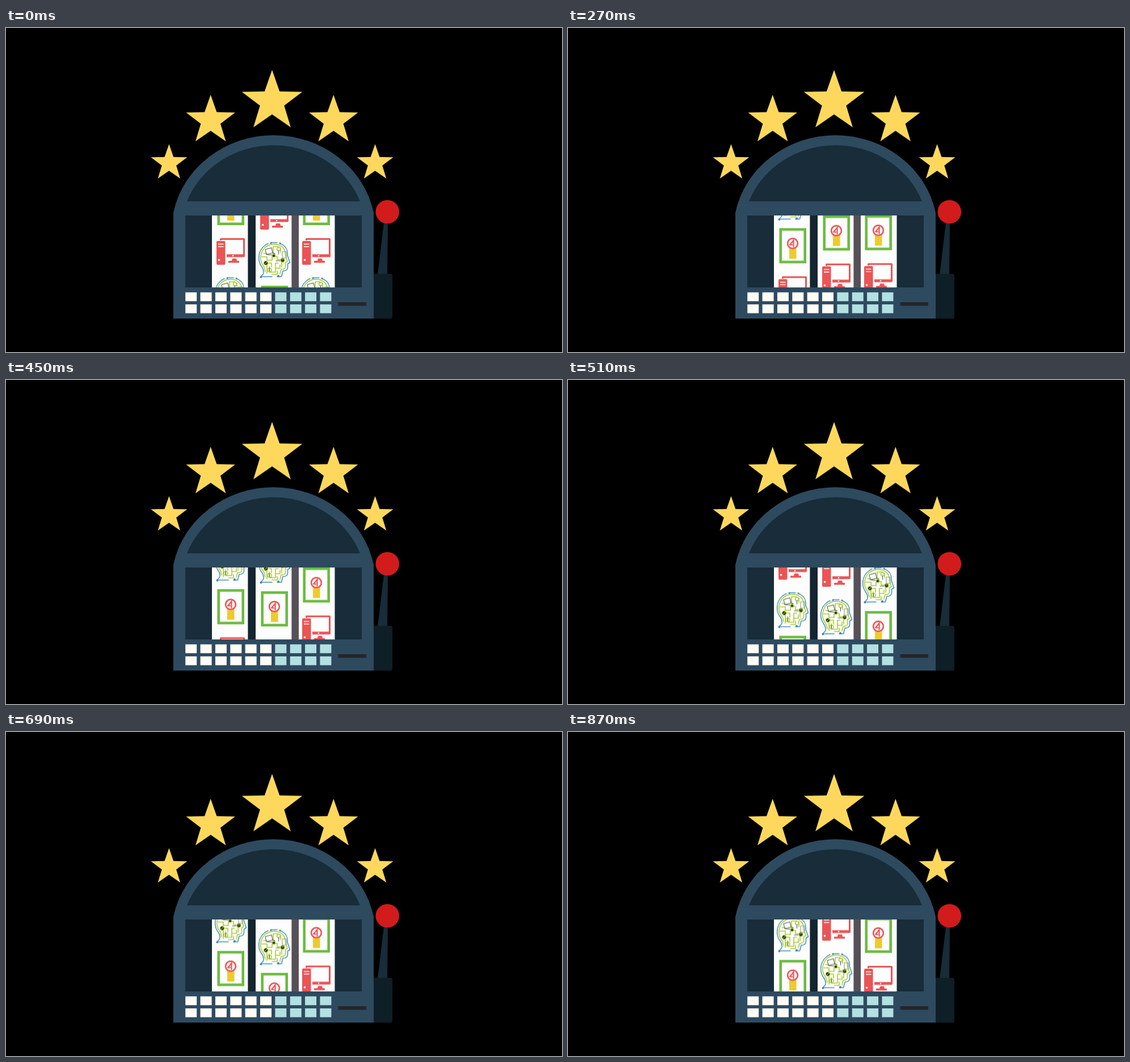
An HTML page that plays this animation: 980 px wide and 572 px high, repeating every 900 ms.

```html
<!DOCTYPE html>
<html lang="en">
<head>
<meta charset="utf-8">
<title>Slot machine</title>
<style>
  html, body { margin: 0; width: 100%; height: 100%; overflow: hidden; background: #000; }
  svg { display: block; }
</style>
</head>
<body>
<svg id="stage" width="980" height="572" viewBox="0 0 980 572">
  <defs>
    <clipPath id="panes">
      <rect x="363" y="331" width="63.5" height="127"/>
      <rect x="440" y="331" width="63.5" height="127"/>
      <rect x="516" y="331" width="63.5" height="127"/>
    </clipPath>

    <g id="computer" fill="#ea5455">
      <path d="M15.5 5V2.500H56.500V32H26" fill="none" stroke="#ea5455" stroke-width="3" stroke-linejoin="round"/>
      <path d="M26 29.500H58V32Q58 34.500 56 34.500H26Z"/>
      <rect x="8" y="6" width="15.500" height="42" rx="2"/>
      <path d="M36 37H43L44 41H48V44.500H29V41H35Z"/>
      <path d="M11 11.500H20.500M11 16H20.500" stroke="#fff" stroke-width="1.700"/>
      <circle cx="12.500" cy="39.500" r="1.800" fill="#fff"/>
      <circle cx="37" cy="32" r="1.300" fill="#fff"/>
    </g>

    <g id="award" fill="none">
      <rect x="11.700" y="2.300" width="43" height="57.500" stroke="#6cbb42" stroke-width="4.600"/>
      <rect x="27" y="35" width="12.500" height="19" fill="#eccb30"/>
      <circle cx="33" cy="27" r="8.900" fill="#fff" stroke="#ea5455" stroke-width="2.600"/>
      <path d="M27.500 30L34.500 21.500V33.500M28 29.500H33" stroke="#ea5455" stroke-width="2.200"/>
    </g>

    <g id="head" fill="none" stroke-linecap="round" stroke-linejoin="round">
      <g stroke="#3f90bd" stroke-width="1.500">
        <path d="M8.500 62L13.500 56Q15.500 50 10.500 43C3 33 4 16 15 7Q18 4 22 2.500M27 1H38M43 2.500C53 6 57 14 56 23L60.500 36L56.500 38.500V45Q56 51 48 51L45.500 61H38"/>
        <path d="M12 61H29"/>
      </g>
      <g stroke="#a9c93c" stroke-width="1.600">
        <path d="M17 52Q16 45 13 41C6 32 8 17 17 9Q28 1 41 5Q53 10 52.500 23L56 34L52.500 36V44Q52 48 45 48L43 56"/>
        <path d="M20 55V37H28V44M24 43V53H35V37H40M35 46H43V40M11 26H20V32H29V25H38V31H46M14 20H20M31 21V8H40M44 10V18M46 33V44M29 57H38V51"/>
        <circle cx="40.500" cy="12" r="3"/>
        <circle cx="24.500" cy="49" r="3.500"/>
      </g>
      <g stroke="#4c5d48" stroke-width="1.100">
        <path d="M17 13L28 10L30 19L19 22ZM19 22L32 23L34 20L30 19"/>
        <path d="M47 17H54V28H47Z" stroke="#8c9b78"/>
        <path d="M40.500 15V21M24.500 46V51M36 33H43"/>
      </g>
      <g fill="#26301f" stroke="#a9c93c" stroke-width="1.200">
        <circle cx="18" cy="37" r="3.600"/>
        <circle cx="32" cy="24" r="2.700"/>
        <circle cx="47.500" cy="32" r="3.400"/>
      </g>
      <path d="M16 39L20 35M46.500 31H48.500" stroke="#c4de58" stroke-width="1"/>
      <g fill="#2f83b3">
        <circle cx="27" cy="1.500" r="1.500"/>
        <circle cx="43" cy="2" r="1.500"/>
        <circle cx="9.500" cy="61.500" r="1.900"/>
        <circle cx="40" cy="60" r="1.900"/>
      </g>
    </g>
  </defs>

  <g id="stars" fill="#fdd85d"></g>

  <path d="M295 513V326A180 170 0 0 1 648 326V513Z" fill="#2e4a5f"/>
  <path d="M319 306A163 153 0 0 1 624 306Z" fill="#182c39"/>
  <rect x="316" y="331" width="311" height="127" fill="#182c39"/>
  <rect x="426" y="331" width="14" height="127" fill="#142530"/>
  <rect x="503" y="331" width="13" height="127" fill="#565158"/>

  <g clip-path="url(#panes)">
    <rect x="363" y="331" width="217" height="127" fill="#fdfdfd"/>
    <rect x="426.500" y="331" width="13.500" height="127" fill="#142530"/>
    <rect x="503.500" y="331" width="12.500" height="127" fill="#565158"/>
    <g id="reels"></g>
  </g>

  <g id="buttons"></g>
  <rect x="585.500" y="484" width="49.500" height="6.500" fill="#24262c"/>

  <path d="M666 344H673L672 436H655Z" fill="#182c39"/>
  <path d="M648 434H678Q681 434 681 437V510Q681 513 678 513H648Z" fill="#0f1f27"/>
  <circle cx="672.300" cy="324.500" r="20.800" fill="#d11c1b"/>
</svg>

<script>
const NS = 'http://www.w3.org/2000/svg';
const LOOP = 900, STEPS = 30;

function add(parent, tag, attrs) {
  const el = document.createElementNS(NS, tag);
  for (const k in attrs) el.setAttribute(k, attrs[k]);
  return parent.appendChild(el);
}
const byId = id => document.getElementById(id);

// Five-pointed stars: centre x, centre y, radius
for (const [cx, cy, r] of [
  [469, 130, 56], [360.7, 163.3, 45.4], [577.3, 163.3, 45.4],
  [287.4, 238.6, 33.5], [650.6, 238.6, 33.5]
]) {
  const points = Array.from({ length: 10 }, (_, i) => {
    const a = i * Math.PI / 5, d = i % 2 ? r * 0.4 : r;
    return `${(cx + d * Math.sin(a)).toFixed(1)},${(cy - d * Math.cos(a)).toFixed(1)}`;
  });
  add(byId('stars'), 'polygon', { points: points.join(' ') });
}

for (let row = 0; row < 2; row++) {
  for (let col = 0; col < 10; col++) {
    add(byId('buttons'), 'rect', {
      x: 316.2 + col * 26.36, y: 466.7 + row * 21.2, width: 20, height: 15.6,
      fill: col < 6 ? '#fffcf4' : '#b3e0e1'
    });
  }
}

// Each set is a computer with an award and a head above it;
// at the joins of the strip a computer stands alone.
const SETS = [601, 370, 67, -164, -476, -707];
const SINGLES = [139, -395, -938];

function addReel(x, y, speed) {
  const strip = add(byId('reels'), 'g', {});
  const icon = (name, top) => add(strip, 'use', { href: '#' + name, x, y: top + y });
  for (const top of SETS) {
    icon('computer', top);
    icon('award', top - 84);
    icon('head', top - 161);
  }
  for (const top of SINGLES) icon('computer', top);
  return strip.animate(
    [{ transform: 'translateY(0px)' }, { transform: `translateY(${speed * STEPS}px)` }],
    { duration: LOOP, iterations: Infinity, easing: `steps(${STEPS}, end)` }
  );
}

// x, starting offset, pixels per step
const spins = [[363, 0, 41.15], [440, -62, 45.53], [514, 0, 38.58]].map(r => addReel(...r));
for (const spin of spins) spin.startTime = 0;
</script>
</body>
</html>
```
